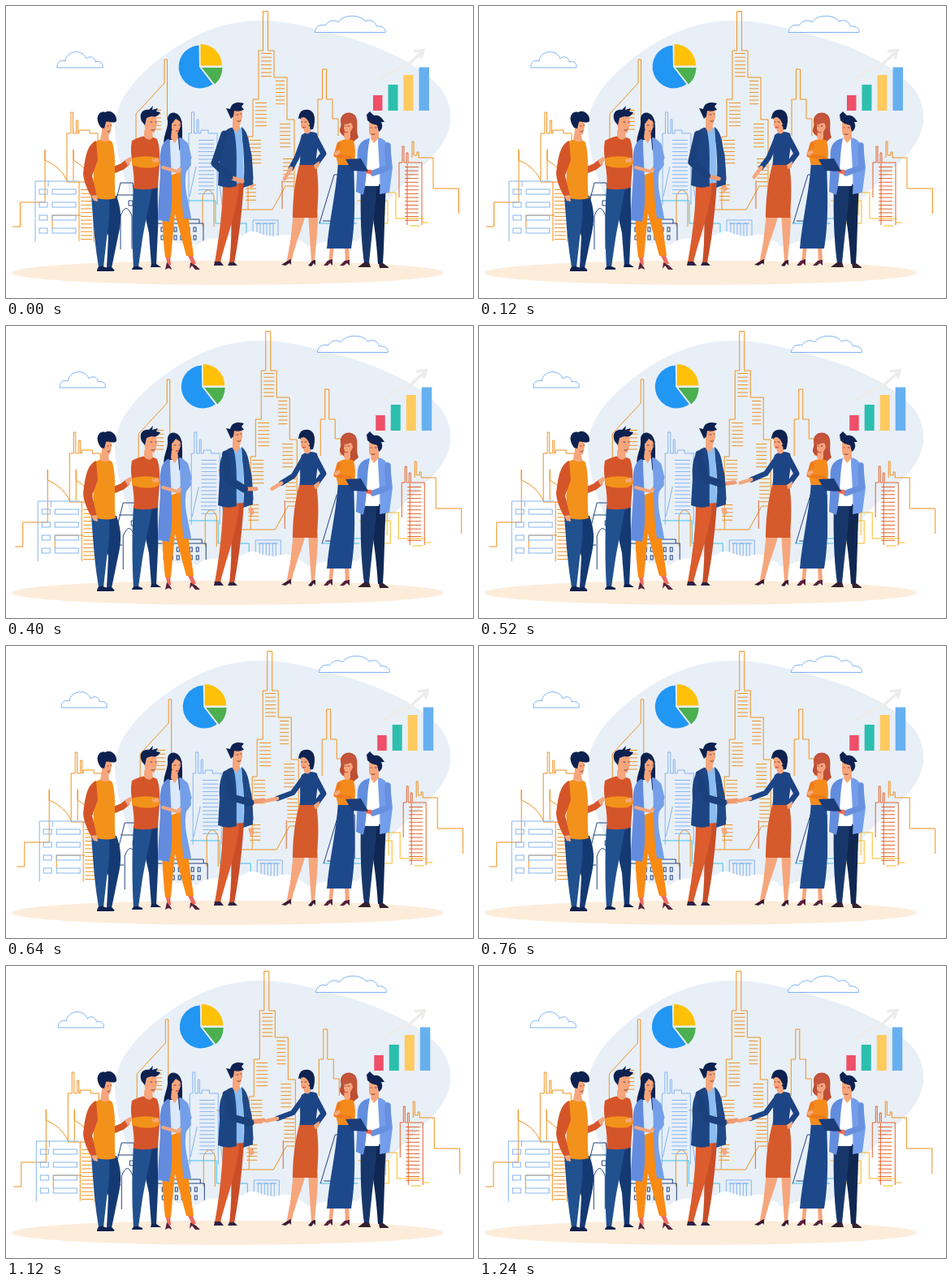
Animation, 575 px wide and 360 px high, one loop 1.28 s. Source, as an HTML page:

```html
<!DOCTYPE html>
<html lang="en">
<head>
<meta charset="utf-8">
<title>Team handshake</title>
<style>
html, body { margin: 0; width: 100%; height: 100%; overflow: hidden; background: #fff; }
svg { display: block; width: 100vw; height: 100vh; }
.line { fill: none; stroke-width: 1; }
.limb { fill: none; stroke-linecap: round; stroke-linejoin: round; }
.orange { stroke: #f0911e; }
.red { stroke: #e4632c; }
.yellow { stroke: #fbb91f; }
.blue { stroke: #84b5f0; }
.navy { stroke: #24447f; }
.skin { fill: #f6a67c; }
.hair { fill: #0d2250; }
.face { fill: none; stroke: #5a2430; stroke-width: .8; stroke-linecap: round; }
.lips { fill: none; stroke: #c92f38; }
</style>
</head>
<body>
<svg viewBox="0 0 575 360" preserveAspectRatio="none">
  <path fill="#e8eff7" d="M134 150C134 110 171 77 204 54C238 31 275 18 311 18C350 18 381 28 414 37C462 50 509 72 533 99C549 118 552 143 540 165C527 189 499 208 477 232C455 256 445 283 424 296H216C187 276 160 249 149 220C141 199 135 174 134 150Z"/>

  <g id="city">
    <g fill="#fff" stroke="#7db3f2">
      <path d="M63 76C62 69 68 66 73 68C74 55 94 52 99 65C104 60 110 64 110 69C116 67 120 71 119 76Z"/>
      <path d="M380 32.500C381 25 387 22 393 24C397 18 404 16 409 20C415 10 436 10 442 19C450 15 456 21 456 25C463 24 468 28 467 32.500Z"/>
    </g>
    <path fill="#2196f3" d="M237.500 48.500A26.500 26.500 0 1 0 254.500 96.500L238 75Z"/>
    <path fill="#ffc107" d="M239.500 47A26.500 26.500 0 0 1 266 73.500H239.500Z"/>
    <path fill="#4caf50" d="M241 76H266.500Q266 89 257 96.500Z"/>
    <path fill="none" stroke="#ececea" stroke-width="3.500" d="M460 91L484 76L490 77L513 56M502 56L514 54.500L511 65"/>
    <g id="bars"></g>

    <g class="line orange">
      <path d="M298 251V161H304V115H311V55H316.500V6.500H322.500V55H330V88H346V140H355V251"/>
      <path d="M384 160V115H389.500V78H394.500V115H402V139H409V160"/>
      <path d="M160 246V133L195 95V66H198.500V140H206"/>
      <path d="M75 217V157H80V131H82.500V157H86.500V141H88.500V157H90V153H103V157H113V180"/>
      <path d="M8 272H17.500V242H48V177V190Q67 198 75 215M83 215V177V190Q101 201 106 215"/>
      <path d="M90 216V291M108 225V291M75 217H105M57 274V258H92"/>
      <path d="M500 187V167H502V184H506V180H508V187H526V225H557.500V256"/>
      <path d="M298 251H328L344 222H355M273 268V251H298M242 272V234Q249 219 256 234V272"/>
      <path d="M258 178H268V235"/>
    </g>
    <g class="line red">
      <path d="M484 236V193H488V173H490V193H493V181H495V193H512V270M494 193V270M340 215V250"/>
    </g>
    <g class="line yellow">
      <path d="M438 267V230H480V262H514M432 240H470V268H440M466 230V258M512 267H520M497 271H510"/>
    </g>
    <g class="line blue">
      <path d="M36 293V216H88M52 216V223M225 245V157H228.500V131H231.500V157H235V140H237V157H240V153H249V157H260V245"/>
      <path d="M304 286V264H335V286M307 268H332M234 198L226 235M260 198L267 250"/>
      <path stroke="#43c1e8" d="M222 240H258V268H296V285M385 268H432M412 262H438V275"/>
    </g>
    <g class="line navy">
      <path d="M133 250L141 218H156L160 250M141 300V259Q148 240 155 259V300M128 270H140M136 233H158"/>
      <path d="M174 268H243V291M185 263H238V268M386 268L404 208H424V262M390 265H405L420 214M151 240H156V246H151Z"/>
    </g>
    <g id="hatch"></g>
  </g>

  <path fill="#fff" d="M20 294Q40 287 59 293Q80 286 103 292Q118 298 132 303Q160 296 185 302Q211 286 235 295Q247 283 269 288Q280 280 291 283Q302 274 314 281Q329 286 339 282Q353 280 359 288Q371 291 371 300Q390 285 431 289V314H20Z"/>
  <ellipse cx="273" cy="328.800" rx="266" ry="15" fill="#fcecda"/>

  <!-- man in orange sweater -->
  <g>
    <path fill="#153a73" d="M114 234L136 234C143 253 142 267 138 284L130 323H124L126 284L119 258Z"/>
    <path fill="#21518f" d="M105 232L127 235C128 252 127 270 124 286L120 322H114C109 292 107 263 105 232Z"/>
    <path class="hair" d="M112 326Q113 320 119 321L133 325.500V327H112ZM124 322H130L134 326H124Z"/>
    <path class="limb" stroke="#d4552a" stroke-width="8" d="M131 203L143 198L148 194"/>
    <path class="skin" d="M146 190L153 186L155 190L150 197Z"/>
    <path fill="#f3921b" d="M109 168Q122 160 131 168C137 190 132 214 135 237Q120 241 107 235Z"/>
    <path fill="#d4552a" d="M111 166C99 171 97 190 95 207C96 218 101 228 106 237L112 234L106 209L113 190Z"/>
    <path class="skin" d="M105 234L112 233L113 241L108 240ZM118 154L126 158L127 166Q121 169 116 165ZM118 139L129 138L130 149L128 158Q122 160 118 154Z"/>
    <path class="hair" d="M113 142C111 134 117 129 122 131C129 127 137 134 136 142C132 146 127 141 123 143L121 151L117 150Q114 146 113 142Z"/>
    <path class="face" d="M125 148h1M129 147h1M125 155q2 0 3-1"/>
  </g>

  <!-- man with crossed arms -->
  <g>
    <path fill="#153a73" d="M169 224H187C186 241 188 261 187 277L185 320H179L176 280L168 244Z"/>
    <path fill="#21518f" d="M157 222L180 224C176 249 171 268 168 287L163 322H157C155 292 155 254 157 222Z"/>
    <path class="hair" d="M155 325Q156 320 163 321L168 323V325ZM178 322L179 318H185L191 322Z"/>
    <path fill="#d4552a" d="M155 166Q172 156 186 164C192 180 188 202 187 224Q172 228 157 225C160 204 151 186 155 166Z"/>
    <path fill="#f3921b" d="M155 188Q169 183 187 187L192 194L183 199Q167 201 155 196Z"/>
    <path class="skin" d="M180 189L188 187V192L181 193ZM170 153H180L181 162Q176 168 170 161ZM170 136L185 135L186 146L183 156Q176 159 171 152Z"/>
    <path class="hair" d="M167 142C163 132 169 127 176 128L181 123L180 128L187 126L185 130L190 131Q187 138 179 136L173 138L171 147Z"/>
    <path class="face" d="M178 143h2M184 143h1M179 153q3 1 4-1"/>
  </g>

  <!-- woman in long coat -->
  <g>
    <path class="hair" d="M199 141C198 130 210 128 215 138C219 149 215 164 219 179L196 174C191 163 200 153 199 141Z"/>
    <path fill="#f98b14" d="M194 203H220C220 240 227 276 231 308H222L208 256L203 310H196C192 276 191 238 194 203Z"/>
    <path fill="#ef6a5c" d="M197 310H202L203 319L199 320ZM224 308H230L234 318L229 318Z"/>
    <path fill="#56213c" d="M196 325L198 316L203 322L204 325L200 323ZM226 324L227 316L234 320L239 325H233L229 320Z"/>
    <path fill="#dce9fa" d="M199 166L212 163L216 204L196 211Z"/>
    <path fill="#648cde" d="M199 164C187 172 190 191 190 206C189 229 187 247 187 264L201 266C208 236 202 195 202 165Z"/>
    <path fill="#749fe9" d="M213 162C225 164 227 179 228 196L222 204C218 224 225 239 228 262H219C214 230 216 194 213 162Z"/>
    <path class="limb" stroke="#f6a67c" stroke-width="4" d="M193 199L211 204L224 192"/>
    <path class="limb" stroke="#749fe9" stroke-width="7" d="M221 171L225 187L218 198"/>
    <path class="skin" d="M204 153H211L212 162L208 169L203 163ZM204 139L214 138L215 148L212 156Q207 159 204 151Z"/>
    <path class="hair" d="M202 148C199 134 213 131 217 144L209 139Z"/>
    <path class="face" d="M207 147h2M213 147h1"/><path class="lips" d="M209 154q3 1 4-1"/>
  </g>

  <!-- woman in navy blouse -->
  <g>
    <path class="skin" d="M354 255H369C365 275 358 287 352 313L345 318L350 291ZM372 255H384C384 278 382 291 380 314L376 316Z"/>
    <path fill="#3b1a35" d="M339 319L347 314L351 312V319L349 317L344 320ZM372 320L377 314L381 313V320L379 317L376 321Z"/>
    <path class="hair" d="M361 137C360 129 369 126 375 129C381 132 381 143 378 152L371 153Z"/>
    <path class="limb" stroke="#1b4283" stroke-width="7" d="M381 163L391 182L382 194"/>
    <path fill="#1d4585" d="M364 159Q373 152 383 157C387 171 380 184 382 198H361C364 185 360 171 364 159Z"/>
    <path fill="#d55a2c" d="M361 196H382C386 220 384 240 383 261H353C353 237 356 215 361 196Z"/>
    <path class="skin" d="M379 196L386 191L385 199L380 201ZM367 148H374L375 155Q371 160 367 155ZM363 137L373 134L375 144L370 152Q365 154 363 148Z"/>
    <path class="hair" d="M360 139C360 130 370 128 376 131C381 134 380 144 377 149L373 144Q371 138 366 137Z"/>
    <path class="face" d="M364 143h1M368 143h2"/><path class="lips" d="M365 149q3 2 4 0"/>
  </g>

  <!-- man in navy jacket -->
  <g>
    <path class="limb" stroke="#1c4380" stroke-width="7" d="M293 160L299 184L301 213"/>
    <path id="farHand" class="skin" d="M298 216L304 215L306 222L301 225Z"/>
    <path fill="#c94e28" d="M276 217H293C291 250 287 285 281 317H275C279 283 277 250 276 217Z"/>
    <path fill="#dc5c2d" d="M267 216L287 219C285 253 271 286 264 316H257C263 282 267 249 267 216Z"/>
    <path fill="#2d2144" d="M256 320L257 315H264L268 320ZM273 320L275 316H281L285 320Z"/>
    <path fill="#8bbcf2" d="M275 151L291 150L293 218L278 219Z"/>
    <path fill="#1d4583" d="M277 150C264 154 262 170 263 188L261 221Q273 226 284 222C283 197 286 174 280 150Z"/>
    <path fill="#1f4886" d="M290 149C300 157 299 171 303 190L304 220L292 224C295 199 292 175 290 149Z"/>
    <path class="skin" d="M279 142H287L288 150L284 156L279 151ZM279 128L290 126L291 137L288 147Q282 149 279 141Z"/>
    <path class="hair" d="M277 139L271 126L276 127C278 118 286 118 293 120L290 124L293 128Q286 131 281 129L280 136Z"/>
    <path class="face" d="M284 134h2M289 133h1M285 142q3 1 4-1"/>
  </g>
  <path id="herSleeve" class="limb" stroke="#1d4585" stroke-width="6.500"/>
  <path id="herHand" class="limb" stroke="#f6a67c" stroke-width="4.500"/>
  <path id="hisHand" class="limb" stroke="#f09a73" stroke-width="5"/>
  <path id="hisSleeve" class="limb" stroke="#1b417c" stroke-width="9"/>

  <!-- woman in orange blouse -->
  <g>
    <path fill="#bd4e34" d="M412 143C411 132 423 128 430 135C435 143 430 151 434 162L426 169L413 158C408 151 414 151 412 143Z"/>
    <path class="skin" d="M399 295H404L402 313L397 318ZM417 295H422L423 314L418 318Z"/>
    <path fill="#56213c" d="M391 320L396 314L402 312V320L399 317L396 320ZM411 320L417 314L423 313V320L420 317L416 320Z"/>
    <path fill="#1d498b" d="M409 192H428C429 229 431 262 425 299H395C398 263 407 228 409 192Z"/>
    <path fill="#f58a1c" d="M409 168Q419 161 428 166Q432 180 428 196H409Q404 182 409 168Z"/>
    <path class="limb" stroke="#ef7b1d" stroke-width="5" d="M410 170L406 184L423 187"/>
    <path class="skin" d="M403 181L410 177L412 181L406 185ZM417 154H424L424 163Q420 168 416 162ZM416 142L426 140L427 150L423 157Q418 159 416 151Z"/>
    <path fill="#c4553a" d="M414 147C410 134 422 130 429 136C434 142 430 149 431 156L425 144Z"/>
    <path class="face" d="M417 148h1M421 148h2"/><path class="lips" d="M417 155q3 2 4 0"/>
  </g>

  <!-- man with tablet -->
  <g>
    <path fill="#102752" d="M449 220H468C466 252 466 288 464 318H458C456 288 453 265 449 246Z"/>
    <path fill="#17376b" d="M437 220H457C454 253 450 285 447 317H441C437 288 436 253 437 220Z"/>
    <path fill="#35202f" d="M433 322L441 316H447L449 322ZM459 317H464L471 322V323H460Z"/>
    <path fill="#fff" d="M445 164L459 163L459 222H440Z"/>
    <path fill="#638ede" d="M448 163C433 166 432 177 433 190L431 229L440 233C446 207 443 187 448 163Z"/>
    <path fill="#739eeb" d="M458 162C472 165 474 178 476 199L472 230L460 232C462 206 458 185 458 162Z"/>
    <path class="limb" stroke="#6791df" stroke-width="7.500" d="M470 172L471 199L452 206"/>
    <path fill="#ef6a5c" d="M440 201L450 202L451 208L443 206ZM424 197L431 198L430 203L425 201Z"/>
    <path fill="#1b3d78" d="M418 189L437 188L446 204L426 203Z"/>
    <path class="skin" d="M450 154H459L459 163L453 169L449 163ZM447 143L460 141L461 151L455 160Q449 163 447 156Z"/>
    <path class="hair" d="M445 141L444 134L448 130L453 135Q460 134 464 140L466 143H462C465 149 462 153 459 155L457 147L450 145Z"/>
    <path class="face" d="M449 150h1M454 150h2M450 158q2 1 4 0"/>
  </g>
</svg>
<script>
const el = id => document.getElementById(id);
const svgNS = "http://www.w3.org/2000/svg";

function add(parent, tag, attrs) {
  const node = document.createElementNS(svgNS, tag);
  for (const key in attrs) node.setAttribute(key, attrs[key]);
  parent.appendChild(node);
}

// Horizontal strokes between x1 and x2, filling y1..y2
function hatch(colour, x1, x2, y1, y2, step = 4.7) {
  let d = "";
  for (let y = y1; y <= y2; y += step) d += `M${x1} ${y}H${x2}`;
  add(el("hatch"), "path", { class: "line " + colour, d });
}

function windows(colour, x, y, w, h, cols, rows, dx, dy) {
  for (let r = 0; r < rows; r++)
    for (let c = 0; c < cols; c++)
      add(el("hatch"), "rect", { class: "line " + colour, x: x + c * dx, y: y + r * dy, width: w, height: h });
}

hatch("orange", 314, 327, 58.5, 88);
hatch("orange", 332, 343, 92.5, 122);
hatch("orange", 307, 321, 119.5, 151);
hatch("orange", 300, 314, 165.5, 196);
hatch("orange", 337, 350, 145.5, 174);
hatch("orange", 341, 354, 188.5, 220);
hatch("orange", 295, 308, 220.5, 240);
hatch("orange", 176, 191, 128.5, 156);
hatch("orange", 92, 106, 226.5, 290);
hatch("blue", 237, 256, 165.5, 235);
hatch("red", 491, 508, 198.5, 268);
windows("blue", 41, 226, 10, 6, 1, 4, 0, 16);
windows("blue", 57, 226, 29, 6, 1, 4, 0, 16);
windows("navy", 191, 273, 3, 5, 6, 2, 8, 10);
windows("blue", 309, 268, 4, 16, 3, 1, 8, 0);

[["#ef4f68", 452, 110, 11.5], ["#2dbfae", 470.5, 97, 12], ["#ffca5e", 489.5, 85, 12], ["#67b0ef", 508.5, 75.5, 12.5]]
  .forEach(([fill, x, y, width]) => add(el("bars"), "rect", { fill, x, y, width, height: 129 - y }));

// Arm joints at rest, half way and at the handshake
const his = [
  [[269, 158], [257, 194], [275, 211], [291, 216]],
  [[270, 158], [268, 190], [288, 207], [301, 209]],
  [[271, 158], [279, 187], [301, 193], [317, 190]]
];
const hers = [
  [[367, 162], [358, 187], [351, 200], [343, 213]],
  [[367, 162], [355, 187], [343, 198], [333, 208]],
  [[367, 162], [353, 181], [334, 188], [320, 191]]
];

const mix = (a, b, k) => a + (b - a) * k;

function pose(keys, t) {
  const k = Math.min(t / 280, 2), i = Math.min(Math.floor(k), 1);
  return keys[i].map((p, j) => p.map((v, n) => mix(v, keys[i + 1][j][n], k - i)));
}

function drawArm(name, [shoulder, elbow, wrist, hand]) {
  el(name + "Sleeve").setAttribute("d", `M${shoulder}L${elbow}L${wrist}`);
  el(name + "Hand").setAttribute("d", `M${wrist}L${hand}`);
}

const LOOP = 1280, STEP = 40, SHIFT = 5.2;

function draw(now) {
  const t = Math.floor(now % LOOP / STEP) * STEP;
  const dx = SHIFT * (1 - Math.abs(1 - 2 * t / LOOP));
  el("city").setAttribute("transform", `translate(${dx} 0)`);
  drawArm("his", pose(his, t));
  drawArm("her", pose(hers, t));
  const drop = Math.min(t / 240, 1) * 9;
  el("farHand").setAttribute("transform", `translate(0 ${drop})`);
}

function loop() {
  draw(performance.now());
  requestAnimationFrame(loop);
}
loop();
</script>
</body>
</html>
```
